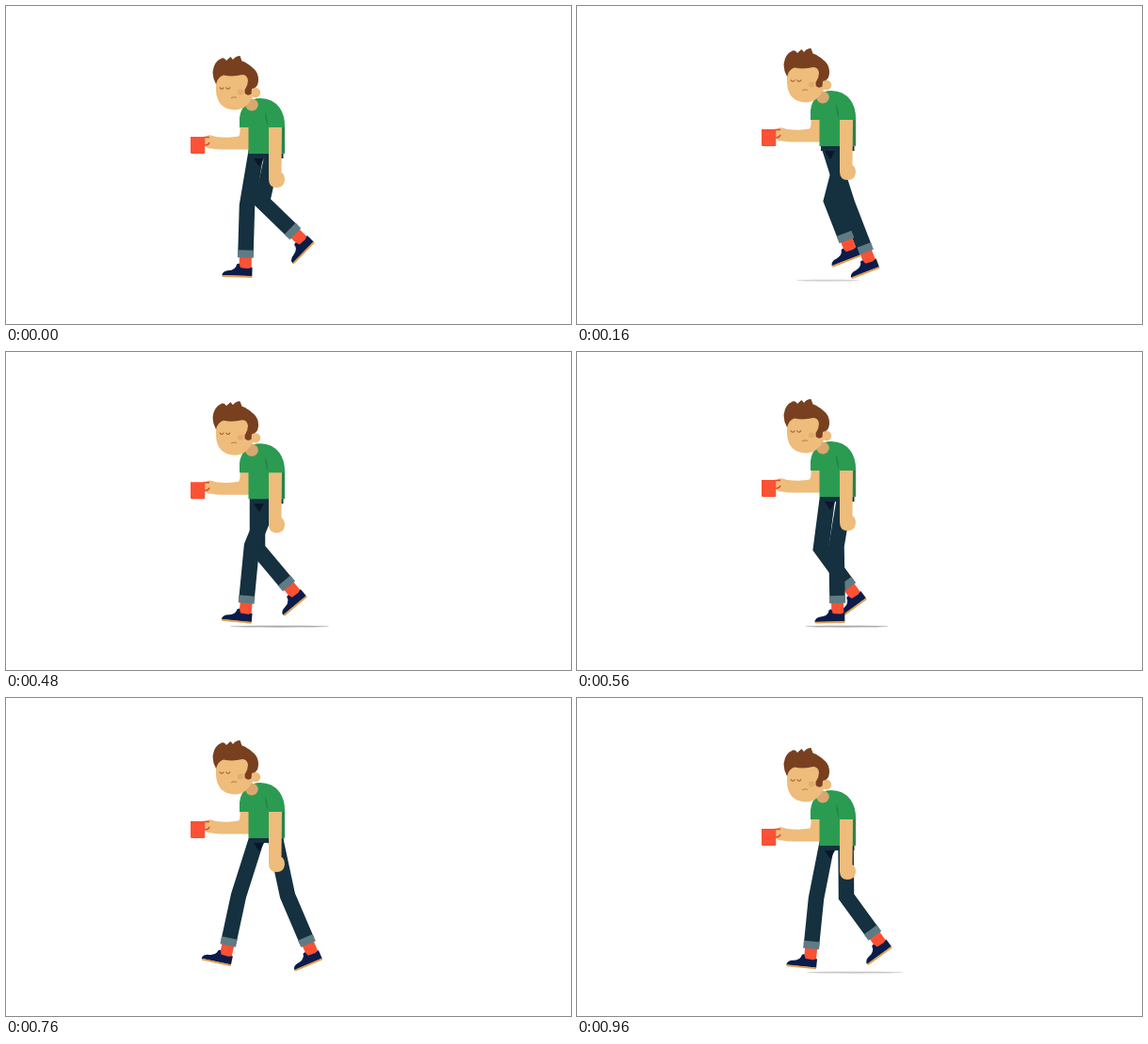
Recreate the animation shown at these times as an HTML page. Size 600 by 338 pixels, loop 1 s.

```html
<!DOCTYPE html>
<html lang="en">
<head>
<meta charset="utf-8">
<title>Sleepy walk</title>
<style>
html, body { margin: 0; width: 100%; height: 100%; overflow: hidden; background: #fff; }
svg { display: block; width: 100vw; height: 100vh; }
.pants { fill: none; stroke: #15303f; stroke-width: 16.5; stroke-miterlimit: 8; }
.skin { fill: #eebc7b; }
.shirt { fill: #2b9b51; }
.shade { fill: #25854a; }
.red { fill: #fb5134; }
.line { fill: none; stroke: #a5552c; stroke-width: 1.1; }
</style>
</head>
<body>
<svg viewBox="0 0 600 338">
  <defs>
    <!-- origin: middle of the trouser cuff -->
    <g id="foot">
      <path class="red" d="M-6.5 2H6.5V16H-6.5z"/>
      <path fill="#0b1c4a" d="M7.5 23.5V14L3 15.5L-5 15L-6.5 10.5Q-9.5 10-9.7 13.5Q-12 17.5-17 18Q-24 18.5-24.5 23.5z"/>
      <path fill="#e0a04e" d="M-24.5 23.3H7.5V25.2H-24z"/>
      <path fill="#5f7b84" d="M-8.5-4H8.5V4H-8.5z"/>
    </g>
  </defs>
  <ellipse id="shadow" cy="291.7" ry="1" fill="#a3a5a2"/>
  <path class="bob" fill="#15303f" d="M259 150H294.5V162H259z"/>
  <g id="legB"><path class="pants"/><use href="#foot"/></g>
  <g id="legA"><path class="pants"/><use href="#foot"/></g>
  <g class="bob">
    <path fill="#0a1728" d="M263 162H274L269 171z"/>
    <!-- far arm and cup -->
    <path class="skin" d="M248.5 126H258V152.500H228Q222 152.500 219 151.500Q212 152 211 147V140Q213 136.500 218 137.500L223 139Q238 140.500 247 138.500Q249 137 248.500 126z"/>
    <path fill="none" stroke="#d8512f" stroke-width="1.5" d="M210 139.500H216M211 148Q215 148 216 145"/>
    <path class="red" d="M196 139H211.300V155.500Q211.300 157 210 157H197.500Q196 157 196 155.500z"/>
    <!-- torso -->
    <path class="shirt" d="M257.500 157V129H248V119Q249 109 256 103Q262 98 270 98Q283 98 290.500 108Q296 116 296 127V157z"/>
    <path class="shade" d="M275 112Q278 117 278.500 129H296V156H279V129Q275 124 275 112z"/>
    <path class="skin" d="M279 128H293L292.500 177Q296 179 296 185Q295 193 287.500 193Q279 193 279 184z"/>
    <path class="shirt" d="M278 129V112Q284 105 291 110Q295.500 117 295.500 129z"/>
    <!-- head -->
    <ellipse cx="261" cy="105" rx="6.800" ry="6.500" fill="#d8a870"/>
    <circle class="skin" cx="265" cy="92" r="5.200"/>
    <path class="skin" d="M223 80Q223 69 242 69Q262 69 262 88V97Q255 110.500 242 110.500Q224 109 223 90z"/>
    <circle cx="249" cy="91.500" r="3" fill="#e5ab70"/>
    <path class="line" d="M227 86.500Q229 90 231.300 86.500M233.500 86.500Q235.800 90 238 86.500"/>
    <path class="line" stroke-opacity=".5" d="M239 98Q242 96 245 97.500"/>
    <path fill="#78401f" d="M223 83Q219 76 219.700 69Q221 59 229 55.500Q232 54.500 234 58L238.500 54L241 57Q244 53 248.500 53L250.500 58.500Q258 61 264 67.500Q269 73 267.800 81Q267 87 261 88L260.500 93.500Q257 96 253.700 93L253.500 89Q257 84 257 79Q256 73 251 73Q241 75.500 231 73.500Q225 75 223 83z"/>
  </g>
</svg>
<script>
const LOOP = 1000, STEP = 40;

// poses: time, knee x, knee y, cuff x, cuff y
const legA = [
  [0, 272, 208, 304.5, 239.5], [160, 270, 207, 285, 245.5],
  [260, 260, 209, 238, 259], [320, 253, 208, 250, 261],
  [480, 261, 206, 255.5, 263], [640, 290, 207, 297.5, 263],
  [760, 299, 210, 319.5, 258], [960, 286, 211, 314, 249.5]
];
const legB = [
  [0, 256, 212, 254.5, 263.5], [160, 287, 210, 305.5, 258],
  [260, 291, 211, 318, 257], [320, 282, 212, 314, 251],
  [480, 267, 209, 298, 246], [640, 251, 208, 276, 248],
  [760, 247, 210, 236.5, 259], [960, 254, 213, 249, 262.5]
];
// once per step: time, body offset
const bob = [[0, 0], [140, -7], [160, -8], [260, -8], [320, -5], [460, 0], [480, -.7]];
// time, left, right, opacity
const shadow = [
  [0, 238, 340, 0], [160, 233, 300, .5], [320, 228, 342, 1], [480, 238, 343, .9],
  [640, 247, 318, .9], [760, 240, 330, 0], [960, 244, 346, .6]
];

const $ = id => document.getElementById(id);
const bobbing = document.querySelectorAll(".bob");

function sample(keys, time, period) {
  const t = time % period;
  const i = keys.findLastIndex(k => k[0] <= t);
  const a = keys[i], b = keys[i + 1] || keys[0];
  const u = (t - a[0]) / ((b[0] || period) - a[0]);
  return a.slice(1).map((v, n) => v + (b[n + 1] - v) * u);
}

function drawLeg(id, hip, keys, t) {
  const [kx, ky, x, y] = sample(keys, t, LOOP);
  const [pants, foot] = $(id).children;
  const angle = Math.atan2(kx - x, y - ky) * 180 / Math.PI;
  pants.setAttribute("d", `M${hip} 147L${kx} ${ky}L${x} ${y}`);
  foot.setAttribute("transform", `translate(${x} ${y}) rotate(${angle})`);
}

function draw(now) {
  const t = Math.floor(now % LOOP / STEP) * STEP;
  drawLeg("legA", 285.5, legA, t);
  drawLeg("legB", 267, legB, t);
  const [dy] = sample(bob, t, LOOP / 2);
  bobbing.forEach(g => g.setAttribute("transform", `translate(0 ${dy})`));
  const [left, right, alpha] = sample(shadow, t, LOOP);
  $("shadow").setAttribute("cx", (left + right) / 2);
  $("shadow").setAttribute("rx", (right - left) / 2);
  $("shadow").setAttribute("opacity", alpha);
}

const start = performance.now();
function frame() {
  draw(performance.now() - start);
  requestAnimationFrame(frame);
}
frame();
</script>
</body>
</html>
```
